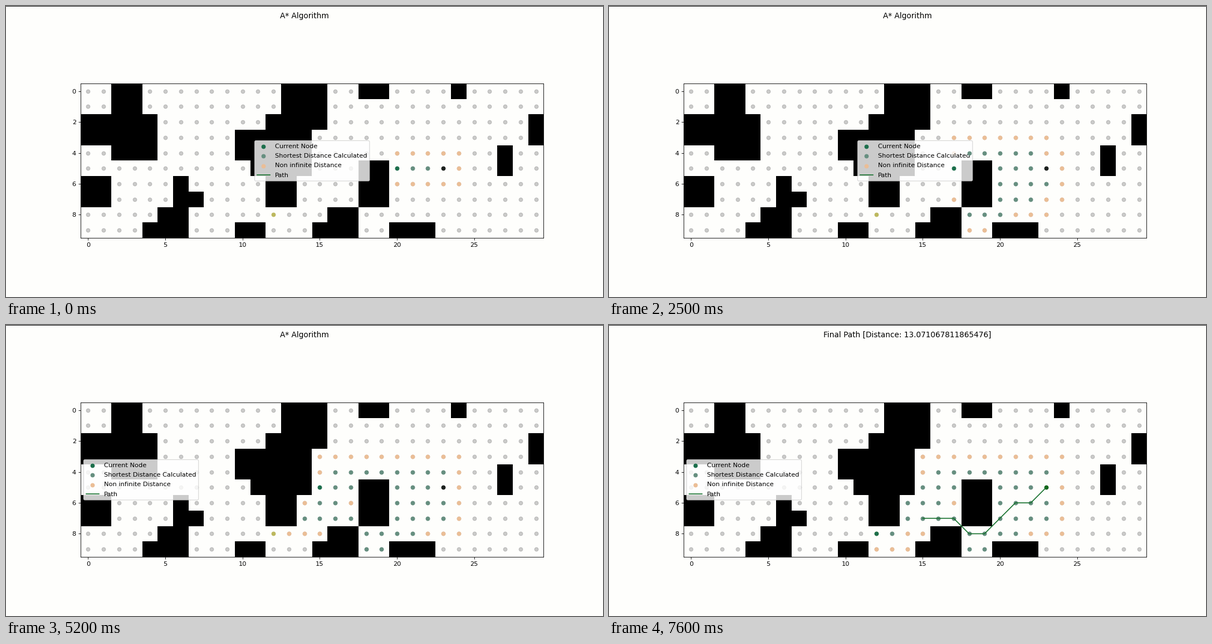
A matplotlib script that plays this animation: 1072 px wide and 522 px high, repeating every 7700 ms.

```python
import math

import matplotlib.pyplot as plt
import numpy as np
from matplotlib.animation import FuncAnimation
from matplotlib.patches import FancyBboxPatch, Rectangle
from matplotlib.transforms import Affine2D

W, H, DPI = 1072, 522, 80
FRAMES, INTERVAL = 77, 100
COLS, ROWS = 30, 10
START, GOAL = (23, 5), (12, 8)

PAPER = "#fefefc"
CURRENT, DONE, OPEN = "#1c6f4c", "#668f80", "#ebbe96"
GOAL_COLOR, START_COLOR = "#bcb85e", "#1c211e"
PATH_COLOR, PATH_START = "#15702c", "#116618"

# Square walls by size: top-left corners, cut off at the border
WALLS = {
    3: [(2, 2), (13, 0), (12, 2), (11, 3), (12, 3), (4, 9), (15, 9), (20, 9)],
    2: [(2, 0), (18, -1), (0, 2), (29, 2), (10, 3), (18, 5), (18, 6),
        (0, 6), (12, 6), (5, 8), (16, 8), (10, 9)],
    1: [(24, 0), (6, 6), (6, 7), (7, 7), (27, 4), (27, 5)],
}
BLOCKS = [(x, y, size) for size, spots in WALLS.items() for x, y in spots]

LEGEND_MOVE_STEP = 20  # "best" spot changes once the centre gets crowded
LEGEND_LEFT, LEGEND_CENTER = 139.4, 446.5


def search_step(tick):
    """Search steps taken so far; they slow down a little over time."""
    return 3 + int(0.94 * tick ** 0.887)


def path_length(tick):
    """Number of path nodes drawn so far."""
    return 1 + int(0.44 * (tick - 56))


def neighbours(node, free):
    x, y = node
    for dx in (-1, 0, 1):
        for dy in (-1, 0, 1):
            other = (x + dx, y + dy)
            if other != node and other in free:
                yield other, math.hypot(dx, dy)


def search(free):
    """Run A*; return its (current, done, open) states, path and length."""
    cost, parent, done, states = {START: 0.0}, {}, [], []

    def rank(node):
        total = cost[node] + math.dist(node, GOAL)
        return round(total, 6), node[1], node[0]

    node = START
    while True:
        waiting = [n for n in cost if n not in done and n != node]
        states.append((node, done[1:], waiting))
        if node == GOAL:
            break
        done.append(node)
        for other, step in neighbours(node, free):
            new = cost[node] + step
            if other not in done and new <= cost.get(other, math.inf):
                cost[other], parent[other] = new, node
        node = min((n for n in cost if n not in done), key=rank)

    path = [GOAL]
    while path[-1] != START:
        path.append(parent[path[-1]])
    return states, path[::-1], cost[GOAL]


def points(nodes):
    return np.array(nodes, float).reshape(-1, 2)


plt.rcParams["font.family"] = "DejaVu Sans"
plt.rcParams["font.size"] = 10.2

wall = {(x + i, y + j) for x, y, size in BLOCKS
        for i in range(size) for j in range(size)}
free = {(x, y) for x in range(COLS) for y in range(ROWS)} - wall
states, path, length = search(free)

fig = plt.figure(figsize=(W / DPI, H / DPI), dpi=DPI, facecolor=PAPER)
fig.add_artist(Rectangle((0, 1 - 1 / H), 1, 1 / H, color="#1c1c1c", lw=0,
                         transform=fig.transFigure))
title = fig.text(0.5, 1 - 22 / H, "", fontsize=12.22, ha="center",
                 va="baseline")

left, top, right, bottom = 133.6, 138.9, 965.4, 416
ax = fig.add_axes([left / W, 1 - bottom / H, (right - left) / W,
                   (bottom - top) / H], facecolor=PAPER)
for x, y, size in BLOCKS:
    ax.add_patch(Rectangle((x - 0.5, y - 0.5), size, size, color="black",
                           lw=0))


def dots(nodes, color, z, **kw):
    xy = points(nodes)
    return ax.scatter(xy[:, 0], xy[:, 1], s=36, color=color, zorder=z, **kw)


dots(sorted(free - {GOAL}), "grey", 1, alpha=0.4)
dots([GOAL], GOAL_COLOR, 2)
open_dots = dots([], OPEN, 3)
done_dots = dots([], DONE, 6)
current_dot = dots([], CURRENT, 6.1)
start_dot = dots([START], START_COLOR, 6.2)
path_line, = ax.plot([], [], color=PATH_COLOR, lw=1.5, zorder=7)

# Legend, laid out in pixels from its left edge and the top of the stage
slide = Affine2D()
pixels = (slide + Affine2D().scale(1 / W, -1 / H).translate(0, 1)
          + fig.transFigure)
ax.add_patch(FancyBboxPatch((0, 241.5), 206.3, 72.4, transform=pixels,
                            boxstyle="round,pad=0,rounding_size=2.3",
                            fc=(1, 1, 1, 0.8), ec=(0.8, 0.8, 0.8, 0.8),
                            lw=1, zorder=5))
labels = [("Current Node", CURRENT), ("Shortest Distance Calculated", DONE),
          ("Non infinite Distance", OPEN), ("Path", None)]
for i, (label, color) in enumerate(labels):
    base = 255 + 17.2 * i
    ax.text(36.4, base, label, transform=pixels, va="baseline", zorder=5.2)
    if color:
        dots([(15.9, base - 2.8)], color, 5.1, transform=pixels)
    else:
        ax.plot([4.5, 27.2], [base - 3.8] * 2, color=PATH_COLOR, lw=1.5,
                transform=pixels, zorder=5.1)

ax.set_xlim(-0.5, COLS - 0.5)
ax.set_ylim(ROWS - 0.5, -0.5)
ax.set_xticks(range(0, COLS, 5))
ax.set_yticks(range(0, ROWS, 2))
ax.tick_params(axis="x", pad=4)


def draw(tick):
    step = min(search_step(tick), len(states) - 1)
    node, done, waiting = states[step]
    current_dot.set_offsets(points([node]))
    done_dots.set_offsets(points(done))
    open_dots.set_offsets(points(waiting))

    moved = step >= LEGEND_MOVE_STEP
    slide.clear().translate(LEGEND_LEFT if moved else LEGEND_CENTER, 0)

    final = node == GOAL
    shown = points(path[:path_length(tick)] if final else [])
    path_line.set_data(shown[:, 0], shown[:, 1])
    start_dot.set_color(PATH_START if final else START_COLOR)
    title.set_text(f"Final Path [Distance: {length:.15f}]" if final
                   else "A* Algorithm")
    return current_dot, done_dots, open_dots, path_line, start_dot, title


anim = FuncAnimation(fig, draw, frames=FRAMES, interval=INTERVAL,
                     init_func=lambda: draw(0), repeat=True, repeat_delay=0,
                     blit=False)
plt.show()
```
